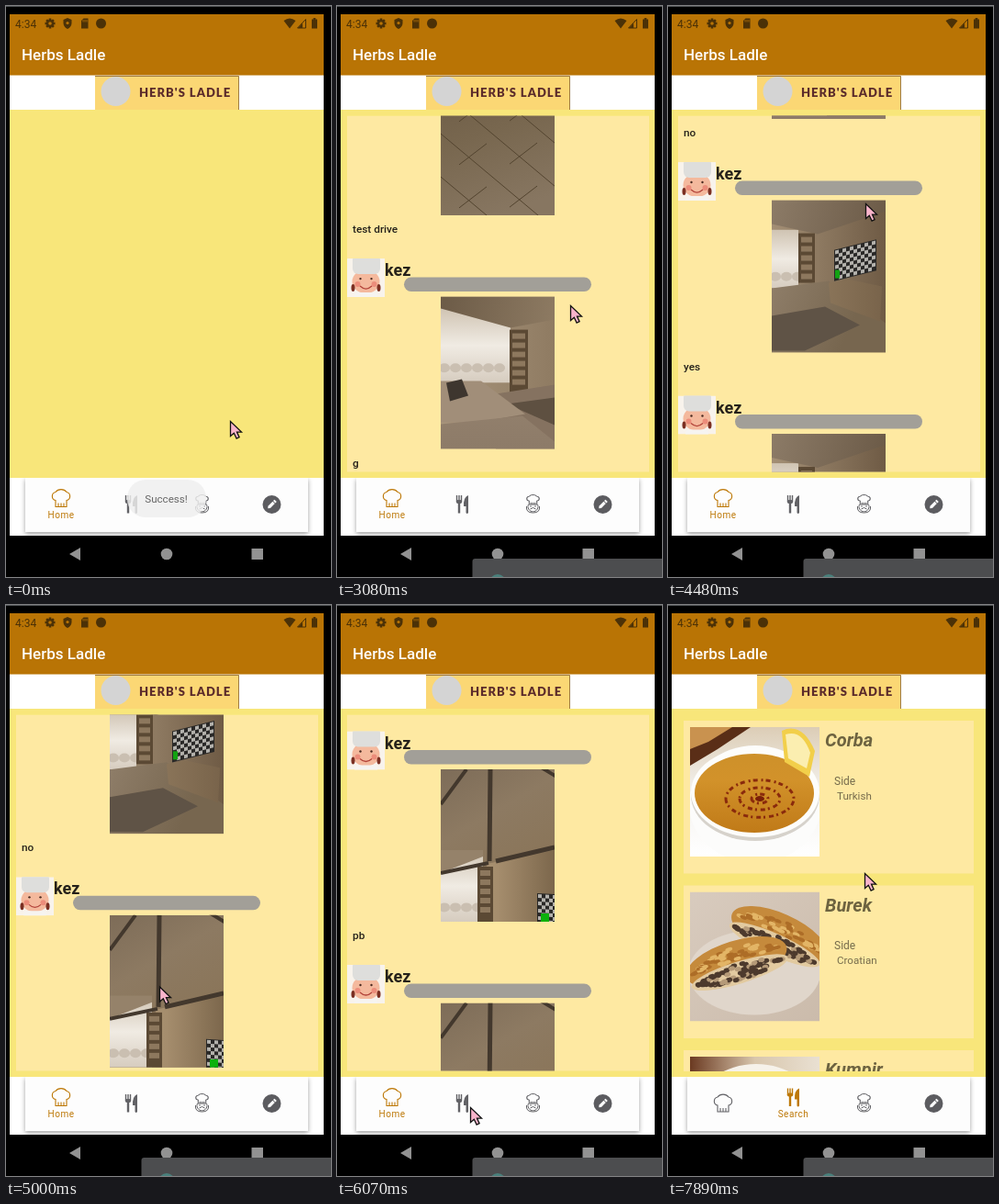
These frames come from a looping animation (354 px wide and 622 px high, 8 s). An HTML page with a canvas:

```html
<!DOCTYPE html>
<html lang="en">
<head>
<meta charset="utf-8">
<title>Recipe app</title>
<style>
html, body { margin: 0; width: 100%; height: 100%; overflow: hidden; background: #000; }
canvas { display: block; width: 354px; height: 622px; }
</style>
</head>
<body>
<canvas id="stage"></canvas>
<script>
const W = 354, H = 622, LOOP = 8000;
const LIST_ON = 650, DRAG = 3045, TAP = 6220, CARDS_ON = 6980, STEP = 130;
const PITCH = 254.5, CARD_PITCH = 179.5;
const ORANGE = '#b97405', ACTIVE = '#bd7807', GREY = '#626266';
const YELLOW = '#f8e67a', PANEL = '#fee9a2', INK = '#25211a';

const canvas = document.getElementById('stage');
const c = canvas.getContext('2d');
const dpr = window.devicePixelRatio || 1;
canvas.width = W * dpr;
canvas.height = H * dpr;

const clamp = v => Math.max(0, Math.min(1, v));
const easeOut = v => 1 - (1 - clamp(v)) ** 2;

// Each flick of the list decelerates; n counts screen refreshes since the first drag.
const flick = (n, start, length, distance) => distance * easeOut((n - start) / length);
const scrollAt = n => flick(n, -1, 8, 422) + flick(n, 8, 12, 665)
  + flick(n, 13, 10, 344.7) + flick(n, 18, 5, 77.3);

const POINTER = [
  { n: -1, x: 244, y: 452 }, { n: 0, x: 254, y: 326 }, { n: 3, x: 242, y: 200 },
  { n: 8, x: 230, y: 430 }, { n: 11, x: 215, y: 215 }, { n: 18, x: 131, y: 566 },
  { n: 19, x: 145, y: 547 }, { n: 30, x: 145, y: 547 }, { n: 31, x: 142, y: 543 },
  { n: 35, x: 246, y: 360 }, { n: 37, x: 214, y: 292 }];

function pointerAt(n) {
  const i = POINTER.findLastIndex(p => p.n <= n);
  if (i < 0) return POINTER[0];
  const a = POINTER[i], b = POINTER[i + 1];
  if (!b) return a;
  const k = (n - a.n) / (b.n - a.n);
  return { x: a.x + (b.x - a.x) * k, y: a.y + (b.y - a.y) * k };
}

function random(seed) {
  return () => {
    seed = (seed * 16807) % 2147483647;
    return seed / 2147483647;
  };
}

function rect(color, x, y, w, h) {
  c.fillStyle = color;
  c.fillRect(x, y, w, h);
}
function round(color, x, y, w, h, r) {
  c.fillStyle = color;
  c.beginPath();
  c.roundRect(x, y, w, h, r);
  c.fill();
}
function oval(color, x, y, rx, ry = rx) {
  c.fillStyle = color;
  c.beginPath();
  c.ellipse(x, y, rx, ry, 0, 0, 7);
  c.fill();
}
function shape(color, d) {
  c.fillStyle = color;
  c.fill(new Path2D(d));
}
function line(color, width, d) {
  c.strokeStyle = color;
  c.lineWidth = width;
  c.stroke(new Path2D(d));
}
function text(s, x, y, font, color, align = 'left', gap = 0) {
  c.font = font + ', sans-serif';
  c.fillStyle = color;
  c.textAlign = align;
  c.letterSpacing = gap + 'px';
  c.fillText(s, x, y);
}
function fade(x, y, ...colors) {
  const g = c.createLinearGradient(0, 0, x, y);
  colors.forEach((col, i) => g.addColorStop(i / (colors.length - 1), col));
  return g;
}
// Draw from a local origin, clipped to w by h when given.
function at(x, y, draw, w, h) {
  c.save();
  c.translate(x, y);
  if (w) {
    c.beginPath();
    c.rect(0, 0, w, h);
    c.clip();
  }
  draw();
  c.restore();
}

function checker(x, y, w, h, skew) {
  at(x, y, () => {
    c.transform(1, skew, 0, 1, 0, 0);
    rect('#292827', -1, -1, w + 2, h + 2);
    for (let i = 0; i * 4 < w; i++)
      for (let j = i % 2; j * 4 < h; j += 2) rect('#b3b1ac', i * 4, j * 4, 4, 4);
  });
}
function shelf(x, y, w, h) {
  rect('#5b4934', x, y, w, h);
  for (let i = 4; i < h - 6; i += 10) rect('#8d785e', x + 3, y + i, w - 6, 6);
}
function windowLight(y, w, h) {
  at(0, y, () => {
    rect(fade(0, h, '#cfc3b2', '#f0ebe3', '#d6ccbf'), 0, 0, w, h);
    for (let x = 4; x < w; x += 12) oval('#cabfb1', x, h * .8, 6, 5);
  }, w, h);
}

function floorPhoto() {
  rect(fade(60, 166, '#6a5944', '#78674f', '#877661'), 0, 0, 124, 166);
  for (let i = -2; i < 4; i++) {
    line('#53442f', 1, `M0 ${30 + i * 47}l124 104`);
    for (const x of [20, 75]) line('#53442f', 1, `M${x} ${47 + i * 47 + x * .84}l30-23`);
  }
}
function sofaPhoto() {
  rect(fade(124, 0, '#a8957c', '#8f7b62'), 0, 0, 124, 166);
  windowLight(12, 76, 82);
  shape(fade(124, 20, '#6c5b47', '#8d7a62'), 'M0 0H124V25L76 34L0 13Z');
  shelf(75, 36, 20, 70);
  shape('#857260', 'M60 106L124 96V166H60Z');
  shape('#5e5041', 'M72 117L124 110V140Z');
  shape('#a18e79', 'M0 92H44L92 128L40 137H0Z');
  shape('#3e362f', 'M6 94L23 90L30 108L10 114Z');
  shape(fade(0, 166, '#a08d79', '#8d7b68'), 'M0 139L89 130L124 158V166H0Z');
}
function screenPhoto() {
  rect(fade(124, 0, '#a38f75', '#6f5b45'), 0, 0, 124, 166);
  windowLight(32, 29, 64);
  shape(fade(124, 30, '#8c7b67', '#6b5a47'), 'M0 0H124V12L50 37L0 26Z');
  shelf(29, 36, 18, 54);
  shape(fade(124, 60, '#988773', '#77664f'), 'M0 96L62 88L124 134V166H0Z');
  shape('#5f5346', 'M0 126L58 116L96 136L36 164H0Z');
  shape(fade(124, 0, '#9a8467', '#78634a'), 'M62 90L82 86L120 94L118 132L64 112Z');
  checker(69, 55, 44, 32, -.25);
  rect('#12a312', 69, 76, 5, 9);
}
function beamPhoto() {
  rect(fade(70, 120, '#7d6c58', '#8d7a62', '#8a7559'), 0, 0, 124, 166);
  windowLight(88, 46, 78);
  shape('#95826a', 'M0 88H46V95L0 113Z');
  shape(fade(124, 0, '#b09a7c', '#a58d6d', '#7c674c'), 'M50 103L124 88V166H50Z');
  shelf(40, 106, 17, 60);
  line('#43382d', 5, 'M54 0L53 100M60 100L124 85');
  line('#43382d', 4, 'M0 38L28 0M0 113L52 102M108-3L126 8');
  checker(106, 136, 20, 34, .06);
  rect('#0cb10c', 109, 157, 9, 9);
}

function avatar() {
  rect('#f8f3ec', 0, 0, 41, 42);
  oval('#f4b99d', 20.5, 25, 15, 13);
  round('#dededc', 6, -4, 30, 21, 6);
  for (const side of [-1, 1]) {
    oval('#7b2f22', 20.5 + side * 14, 32, 2, 4);
    oval('#ec8d7b', 20.5 + side * 9, 28, 3);
    oval('#4a2a20', 20.5 + side * 6, 22, 1.2);
  }
  line('#b3443a', 1.3, 'M14 30Q20.5 36 27 30');
  round('#f6f4f1', 8, 37, 25, 8, 4);
}

const POSTS = [['test drive', floorPhoto], ['g', sofaPhoto], ['no', sofaPhoto],
  ['yes', screenPhoto], ['no', screenPhoto], ['yes', beamPhoto], ['pb', beamPhoto],
  ['pb', beamPhoto]];

function post(caption, photo, y) {
  at(11, y, avatar, 41, 42);
  text('kez', 52, y + 19, 'bold 18px Roboto', INK);
  round('#a29f98', 73, y + 20.5, 204, 15.5, 8);
  at(113, y + 41.5, photo, 124, 166);
  text(caption, 17, y + 226.5, '500 11.8px Roboto', INK);
}
function feed(scroll) {
  at(0, 119.5, () => {
    rect(PANEL, 11, 0, 329, 389);
    POSTS.forEach(([caption, photo], i) => {
      const y = i * PITCH - scroll;
      if (y > -PITCH && y < 390) post(caption, photo, y);
    });
  }, 340, 388);
}

function soup() {
  rect(fade(0, 141, '#dccdb6', '#f4f2ee', '#ffffff'), 0, 0, 141, 141);
  shape('#5a2e17', 'M0 0H66L30 24L0 42Z');
  shape('#c9924f', 'M0 0H46L20 16L0 24Z');
  oval('#fcfcfb', 71, 84, 72, 64);
  oval('#d6d2cb', 71, 74, 70, 50);
  oval('#fdfdfb', 71, 71, 70, 49);
  oval(fade(0, 115, '#c98f2a', '#d2922a', '#c07a18'), 70, 72, 65, 43);
  c.setLineDash([5, 3, 2, 4]);
  for (const r of [9, 22, 37]) line('#8a2a0c', 3, `M${76 - r} 78a${r} ${r * .55} 0 1 0 ${2 * r} 0a${r} ${r * .55} 0 1 0 ${-2 * r} 0`);
  c.setLineDash([]);
  oval('#7a1f08', 76, 78, 5, 3);
  shape('#f2cf4a', 'M100 4Q122-6 136 26L130 54L103 38Z');
  shape('#fbeeb0', 'M104 8Q122 2 131 28L127 45L107 34Z');
}
// A cut slice: browned crust above, speckled filling below.
function slice(x, y, tilt, half, seed) {
  const rnd = random(seed);
  at(x, y, () => {
    c.rotate(tilt);
    oval('#c58a3c', 0, -5, half, 23);
    for (let i = 0; i < 60; i++) {
      const u = rnd() * 2 - 1;
      oval(i % 2 ? '#e3b566' : '#ad6d27', u * half * .85, -6 - rnd() * 15 * (1 - u * u), 4, 2);
    }
    oval('#e2caa0', 0, 7, half * .96, 12);
    for (let i = 0; i < 90; i++) {
      const u = rnd() * 2 - 1;
      oval(i % 4 ? '#4d3a2d' : '#b59a78', u * half * .85, 7 + (rnd() - .5) * 18 * (1 - u * u), 3.5, 2.5);
    }
  });
}
function pastry() {
  rect(fade(141, 141, '#d8cbbe', '#cbbbab'), 0, 0, 141, 141);
  oval('#e0d6cb', 70, 88, 72, 46);
  slice(95, 51, .42, 56, 11);
  slice(52, 81, -.3, 57, 29);
}
function potato() {
  rect(fade(141, 0, '#6b3a22', '#d8c6ac', '#e9e0d2'), 0, 0, 141, 141);
  oval('#f6f2ea', 72, 56, 64, 48);
  oval('#c98a3c', 75, 48, 38, 30);
}

const DISHES = [['Corba', 'Turkish', soup], ['Burek', 'Croatian', pastry], ['Kumpir', 'Turkish', potato]];

function recipes() {
  at(17, 113, () => DISHES.forEach(([name, origin, photo], i) => {
    const y = 13 + i * CARD_PITCH;
    rect(PANEL, 0, y, 316, 166.5);
    at(7, y + 7, photo, 141, 141);
    text(name, 154, y + 28, 'italic bold 20px Roboto', '#6d6340');
    text('Side', 164, y + 69.5, '12px Roboto', '#766c4c');
    text(origin, 167, y + 85.5, '11.6px Roboto', '#766c4c');
  }), 316, 395);
}

function hatIcon(color, width = 1.1) {
  line(color, width, 'M-6 9V2A4.6 4.6 0 0 1-6-7A7 6 0 0 1 6-7A4.6 4.6 0 0 1 6 2V9ZM-3 5V9M0 5V9M3 5V9');
}
function cutleryIcon(color) {
  for (const x of [-6, -3.5, -1]) rect(color, x - .7, -10, 1.4, 7);
  round(color, -6.7, -5, 6.4, 4, 2);
  rect(color, -4.7, -3, 2.4, 12.5);
  shape(color, 'M6.5-10V9Q5.2 11 4 9V2H1.5Q1-8 6.5-10Z');
}
function chefIcon() {
  at(0, -5, () => {
    c.scale(.7, .55);
    hatIcon(GREY, 1.6);
  });
  line(GREY, 1, 'M-5 0A5.5 5.5 0 1 0 5 0M-7 2Q-8 9 0 9T7 2M-3 5Q0 2 3 5');
  for (const x of [-2.5, 2.5]) oval(GREY, x, 2, .8);
}
function pencilIcon() {
  oval('#5c5c60', 0, 0, 10);
  at(0, 0, () => {
    c.rotate(-Math.PI / 4);
    shape('#fff', 'M-6 0L-4-1.7H3V1.7H-4Z');
    rect('#fff', 3.8, -1.7, 2, 3.4);
  });
}

function tabs(t, n) {
  at(4, 514, () => {
    rect('#fff', 0, 0, 342, 63);
    c.shadowColor = 'rgba(0,0,0,.38)';
    c.shadowBlur = 5 * dpr;
    c.shadowOffsetY = 2 * dpr;
    rect('#fdfdfd', 17, 0, 308, 59);
  }, 342, 63);

  const k = clamp((n - 23) / 3);
  if (t >= TAP && k < 1) {
    at(21, 514, () => oval(`rgba(189,120,7,${.2 - .12 * k})`, 115.5, 29, 20 + 25 * k), 308, 59);
  }
  const items = [['Home', 60, 1 - k, hatIcon], ['Search', 136.5, k, cutleryIcon]];
  for (const [label, x, on, icon] of items) {
    at(x, 543 - 6.5 * on, () => icon(on > .5 ? ACTIVE : GREY));
    c.globalAlpha = on;
    text(label, x, 558, '10px Roboto', ACTIVE, 'center', .5);
    c.globalAlpha = 1;
  }
  at(213.5, 543, chefIcon);
  at(289.5, 543, pencilIcon);
}

function toast(t) {
  const out = clamp((2010 - t) / 600);
  if (!out) return;
  if (t < 770) round('rgba(240,240,240,.82)', 132, 516, 86, 41, 20);
  else rect(`rgba(241,241,241,${.78 * out})`, 130, 533, 91, 20);
  if (t < 1630) {
    c.globalAlpha = out;
    text('Success!', 174.5, 541, '11.6px Roboto', t < 1360 ? '#666' : '#333', 'center');
    c.globalAlpha = 1;
  }
}

function header() {
  rect(ORANGE, 4, 9, 342, 67);
  const ink = '#4b3107';
  text('4:34', 10, 24, '12px Roboto', ink);
  at(48, 19, () => {
    for (let i = 0; i < 4; i++) {
      c.rotate(Math.PI / 4);
      rect(ink, -1.3, -5.5, 2.6, 11);
    }
    oval(ink, 0, 0, 4);
    oval(ORANGE, 0, 0, 1.8);
  });
  shape(ink, 'M67 13L71.5 15V19Q71 23 67 25Q63 23 62.5 19V15Z');
  oval(ORANGE, 67, 18.5, 1.6);
  shape(ink, 'M82 16L84.5 13.5H89.5V24.5H82Z');
  for (const x of [84, 86, 88]) rect(ORANGE, x - .4, 15, .8, 2.5);
  oval(ink, 103.5, 19, 5.5);
  shape(ink, 'M302.5 16Q309 11 315.5 16L309 24.5Z');
  line(ink, 1, 'M317.5 24H326.5V14.5Z');
  shape(ink, 'M318 24H323V18.5Z');
  rect(ink, 333, 14.5, 6, 10);
  rect(ink, 334.7, 13, 2.6, 2);
  text('Herbs Ladle', 17, 59, '500 17px Roboto', '#fff');

  rect('#fff', 4, 75.5, 342, 37.5);
  rect('#fbd774', 97, 76, 157, 37);
  line('#a07c45', 1, 'M97 76.5H253.5V113');
  oval('#d4d4d4', 119.5, 93, 16);
  text("HERB'S LADLE", 145, 99, '900 13px Lato', '#5c2c2b', 'left', 1);
}

function systemBar(t) {
  const grey = '#929292';
  shape(grey, 'M69 597L81 590V604Z');
  oval(grey, 175, 597, 6.3);
  rect(grey, 267.5, 591, 12.5, 12);
  if (t < 1510) return;
  round('#4c4d4f', 147.5, 602, 215, 30, 3);
  oval('#49807c', 175, 628, 9);
}

function pointer({ x, y }) {
  at(x + .5, y + .5, () => {
    const arrow = 'M0 0V16L3.8 12.8L6.6 18.6L9.6 17.2L7 11.6H12Z';
    shape('#f9b4cb', arrow);
    line('#111', 1.3, arrow);
  });
}

function draw(t) {
  const n = Math.max(-1, Math.floor((t - DRAG) / STEP));
  c.setTransform(dpr, 0, 0, dpr, 0, 0);
  rect('#000', 0, 0, W, H);
  rect('#4a4d50', 0, 0, W, 1);
  header();
  rect(YELLOW, 4, 113, 342, 401);
  if (t >= LIST_ON && t < TAP) feed(scrollAt(n));
  if (t >= CARDS_ON) recipes();
  tabs(t, n);
  toast(t);
  systemBar(t);
  pointer(pointerAt(n));
}

const start = performance.now();
function tick() {
  draw((performance.now() - start) % LOOP);
  requestAnimationFrame(tick);
}
tick();
</script>
</body>
</html>
```
